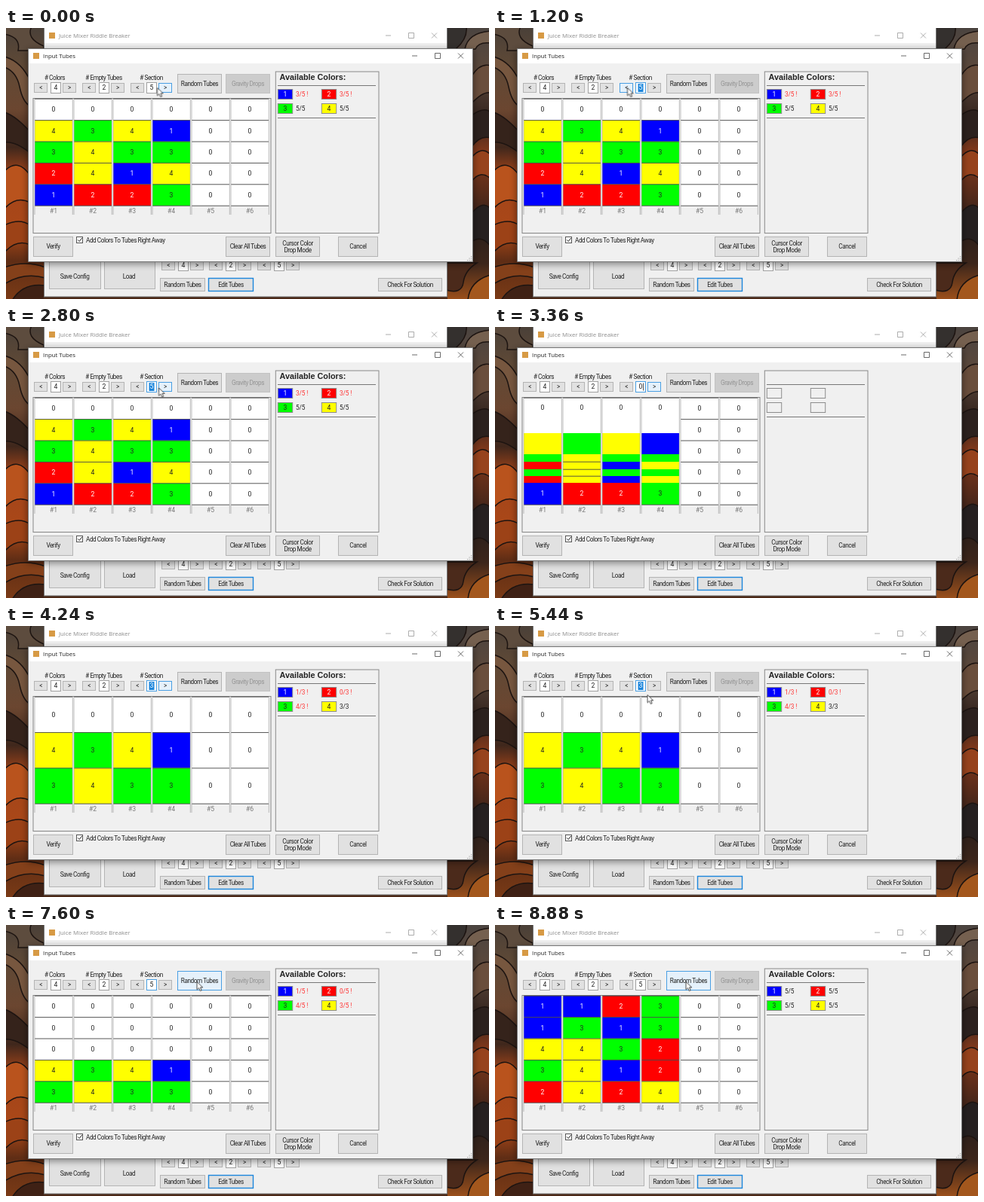
Recreate the animation shown at these times as an HTML page. Size 640x360 px, loop 8.96 s.

```html
<!DOCTYPE html>
<html lang="en">
<head>
<meta charset="utf-8">
<title>Tube editor</title>
<style>
  html, body { margin: 0; width: 100%; height: 100%; overflow: hidden; background: #42271a; }
  svg { display: block; position: absolute; left: 0; top: 0; }
  text { font: 8.2px Roboto, "Liberation Sans", sans-serif; letter-spacing: -.44px; fill: #222; }
  .title { font: 7.8px "Open Sans", sans-serif; letter-spacing: 0; }
  .head { font: bold 10.8px "Liberation Sans", Arial, sans-serif; letter-spacing: 0; }
  .num { font-size: 8.6px; letter-spacing: 0; }
  .bang { letter-spacing: -.1px; }
</style>
</head>
<body>
<svg width="640" height="360" viewBox="0 0 640 360">
  <defs>
    <linearGradient id="wallL" x2="0" y2="1">
      <stop offset="0" stop-color="#4a4038"/><stop offset=".14" stop-color="#5f4936"/>
      <stop offset=".3" stop-color="#6b4630"/><stop offset=".44" stop-color="#3f271c"/>
      <stop offset=".54" stop-color="#a1441a"/><stop offset=".75" stop-color="#ab4818"/>
      <stop offset=".86" stop-color="#5f2d15"/><stop offset="1" stop-color="#7a3a16"/>
    </linearGradient>
    <linearGradient id="wallR" x2="0" y2="1">
      <stop offset="0" stop-color="#4b4440"/><stop offset=".16" stop-color="#5c483b"/>
      <stop offset=".33" stop-color="#35251f"/><stop offset=".46" stop-color="#83391b"/>
      <stop offset=".6" stop-color="#5a2c1a"/><stop offset=".74" stop-color="#2b1f1b"/>
      <stop offset=".87" stop-color="#3d261b"/><stop offset="1" stop-color="#9a4f1b"/>
    </linearGradient>
    <filter id="soft" x="-5%" y="-5%" width="110%" height="115%"><feGaussianBlur stdDeviation="4"/></filter>
  </defs>
  <g id="base"></g>
  <g id="live"></g>
  <path id="cursor" d="M0 0V10.4L2.5 8.1L4.3 12L6.2 11.2L4.5 7.4H7.8Z" fill="#fff" stroke="#222" stroke-width=".8"/>
</svg>
<script>
const LOOP = 8960;
const $ = id => document.getElementById(id);
const COLORS = ['#fff', '#00f', '#f00', '#0f0', '#ff0'];

const rect = (x, y, w, h, fill, stroke = 'none', sw = 1) =>
  `<rect x="${x}" y="${y}" width="${w}" height="${h}" fill="${fill}" stroke="${stroke}" stroke-width="${sw}"/>`;
const path = (d, stroke, sw = 1, fill = 'none') =>
  `<path d="${d}" fill="${fill}" stroke="${stroke}" stroke-width="${sw}"/>`;
const text = (x, y, s, { anchor = 'middle', fill = '#222', cls = '' } = {}) =>
  `<text x="${x}" y="${y + 2.9}" text-anchor="${anchor}" style="fill:${fill}" class="${cls}">${s}</text>`;
const left = (x, y, s, o) => text(x, y, s, { anchor: 'start', ...o });

function button(x, y, w, h, label, look = '') {
  const [fill, stroke, ink, sw] = {
    hot: ['#e5f1fb', '#4a9fe3', '#222', 1],
    main: ['#e1e1e1', '#1c86dc', '#222', 1.4],
    off: ['#cccccc', '#c2c2c2', '#949494', 1],
  }[look] || ['#e1e1e1', '#b4b4b4', '#222', 1];
  const lines = label.split('|');
  return rect(x + .5, y + .5, w - 1, h - 1, fill, stroke, sw) + lines.map((s, i) =>
    text(x + w / 2, y + h / 2 + (i - (lines.length - 1) / 2) * 9, s, { fill: ink })).join('');
}

const field = (x, y, value, stroke = '#a0a0a0') =>
  rect(x + .5, y + .5, 13, 14, '#fff', stroke) + text(x + 7, y + 7.5, value, { cls: 'num' });

const spinner = (x, y, value) =>
  button(x, y + 1, 18, 13, '&lt;') + field(x + 22, y, value) + button(x + 38, y + 1, 18, 13, '&gt;');

// Minimise, maximise and close marks
const captionMarks = (x, y, ink) =>
  path(`M${x} ${y}h7M${x + 30.5} ${y - 3.5}h7v7h-7zM${x + 61} ${y - 3.5}l7 7m0-7l-7 7`, ink, .8);

function wallpaper() {
  const blob = (d, fill) => path(d, '#1d1411', 1.5, fill);
  return rect(0, 0, 60, 360, 'url(#wallL)') + rect(580, 0, 60, 360, 'url(#wallR)') +
    blob('M-2 -2H34Q26 14 50 24V30H16Q20 12 -2 8Z', '#5d4c3e') +
    blob('M-2 52Q14 58 18 78T32 104V70Q20 44 -2 38Z', '#77573f') +
    blob('M-2 112Q12 116 32 138V166Q12 150 -2 152Z', '#35231b') +
    blob('M-2 190Q16 172 32 196V232Q14 222 -2 240Z', '#b9531d') +
    blob('M-2 262Q18 252 32 262V288Q14 280 -2 298Z', '#9c4217') +
    blob('M-2 318Q26 308 52 318V332Q24 324 -2 340Z', '#84401a') +
    blob('M8 362Q22 338 52 342V362Z', '#3f2115') +
    blob('M583 -2H610Q612 14 596 28H583Z', '#34302e') +
    blob('M608 28Q612 6 642 4V20Q626 18 622 28Z', '#75604f') +
    blob('M617 64Q628 46 642 50V86Q632 84 617 100Z', '#6a4e3c') +
    blob('M617 116Q634 104 642 112V146Q628 142 617 158Z', '#2c211e') +
    blob('M617 172Q630 156 642 168V200Q628 188 617 204Z', '#97431d') +
    blob('M617 246Q632 228 642 240V290Q630 274 617 284Z', '#262020') +
    blob('M583 312H624Q608 322 606 338T583 348Z', '#4b2a1b') +
    blob('M612 362Q614 336 642 328V362Z', '#a3571d') +
    rect(50, 357, 535, 3, '#4b2917');
}

function rearWindow() {
  return rect(50.5, -1, 534, 358, '#f0f0f0', '#777') + rect(51, 0, 533, 20, '#fff') +
    rect(57, 6, 8, 8, '#d79a45') +
    left(70, 10, 'Juice Mixer Riddle Breaker', { cls: 'title', fill: '#8c8c8c' }) +
    captionMarks(503, 10, '#999') +
    button(57, 300, 69, 47, '') + text(91, 330, 'Save Config') +
    button(130, 300, 68, 47, '') + text(163, 330, 'Load') +
    [[206, 4], [269, 2], [333, 5]].map(([x, v]) => spinner(x, 308, v)).join('') +
    button(204, 332, 60, 18, 'Random Tubes') + button(268, 332, 60, 18, 'Edit Tubes', 'main') +
    button(493, 332, 85, 18, 'Check For Solution');
}

function frontWindow() {
  let grip = '';
  for (let i = 0; i < 3; i++)
    for (let j = 0; j <= i; j++) grip += rect(616 - 2.5 * j, 303 + 2.5 * i, 1.2, 1.2, '#aaa');
  return `<rect x="28" y="29" width="592" height="285" opacity=".4" filter="url(#soft)"/>` +
    rect(29.5, 27.5, 589, 283, '#f0f0f0', '#777') + rect(30, 28, 588, 19, '#fff') +
    rect(36, 33, 8, 8, '#d79a45') + left(49, 37, 'Input Tubes', { cls: 'title' }) +
    captionMarks(538, 37, '#444') +
    text(64.5, 66, '# Colors') + text(129.5, 66, '# Empty Tubes') + text(192.5, 66, '# Section') +
    spinner(37, 72, 4) + spinner(101, 72, 2) +
    button(291, 61, 59, 26, 'Gravity Drops', 'off') +
    rect(36, 93.5, 315, 179, '#f0f0f0', '#858585') +
    rect(357.3, 58, 136.7, 214.5, '#f0f0f0', '#8a8a8a') +
    path('M360 76.5H490M360 119.5H490', '#777') +
    button(36, 277, 53, 27, 'Verify') +
    rect(93.5, 277.5, 8, 8, '#fff', '#555') + path('M95.2 281.4l2 2.1l3.4-4.5', '#222') +
    left(106, 282, 'Add Colors To Tubes Right Away') +
    button(291, 277, 59, 27, 'Clear All Tubes') +
    button(357, 277, 59, 27, 'Cursor Color|Drop Mode') + button(440, 277, 53, 27, 'Cancel') + grip;
}

const ink = c => c == 1 || c == 2 ? '#fff' : '#222';

function cell(col, y, h, c, { label = true, line = true, labelY = y + h / 2 } = {}) {
  const x = 38 + col * 52;
  return rect(x, y, 50, h, COLORS[c]) + (line ? path(`M${x} ${y + .2}h50`, '#444', .9) : '') +
    (label ? text(x + 25, labelY, c, { fill: ink(c), cls: 'num' }) : '');
}

// A column caught halfway through its repaint
function torn(col, colors) {
  const edges = [141, 169, 179, 189, 198, 207, 236];
  return cell(col, 94, 47, 0, { labelY: 107.5 }) + [...colors].map((c, i) =>
    cell(col, edges[i], edges[i + 1] - edges[i], c, { label: i == 5, line: c == colors[i - 1] })).join('');
}

function tubes({ rows, tornCols }) {
  let out = '';
  for (let col = 0; col < 6; col++) {
    const x = 38 + col * 52, h = 142 / rows.length;
    out += rect(x - 1, 94, 52, 142, '#fff');
    out += tornCols && col < 4 ? torn(col, tornCols[col])
      : rows.map((r, i) => cell(col, 94 + i * h, h, r[col] || 0)).join('');
    out += path(`M${x} 236.2h50`, '#444', .9) + path(`M${x} 94V248M${x + 50.3} 94V248`, '#aaa', .8) +
      text(x + 25, 243.5, '#' + (col + 1), { fill: '#777', cls: 'num' });
  }
  return out;
}

function legend({ counts, heading }) {
  let out = heading ? left(362.5, 66.2, 'Available Colors:', { cls: 'head' }) : '';
  for (let i = 0; i < 4; i++) {
    const x = 360 + (i % 2) * 58, y = i < 2 ? 82 : 101, c = i + 1;
    out += rect(x + .3, y - .5, 19.4, 13, counts ? COLORS[c] : '#f0f0f0', '#8c8c8c');
    if (!counts) continue;
    const n = counts[i], full = n[0] == n[2];
    out += text(x + 10, y + 6, c, { fill: ink(c), cls: 'num' }) +
      left(x + 24, y + 6, full ? n : n + ' !', { fill: full ? '#222' : '#f33', cls: 'bang' });
  }
  return out;
}

function section({ sec, sel, caret, focus, hot }) {
  const look = k => hot == k ? 'hot' : '';
  return button(165, 73, 18, 13, '&lt;', look('less')) + button(202, 73, 18, 13, '&gt;', look('more')) +
    field(186, 72, sec, focus ? '#4a9fe3' : '#a0a0a0') +
    (sel ? rect(189.5, 74, 7, 11, '#1c86dc') + text(193, 79.5, sec, { fill: '#fff', cls: 'num' }) : '') +
    (caret ? path('M196.5 74.5v10', '#222', .8) : '') +
    button(227, 61, 59, 26, 'Random Tubes', look('random'));
}

const split = s => s.split(' ');
const FIVE = split('0000 4341 3433 2414 1223');
const STEPS = [
  [0, { sec: 5, sel: false, caret: false, focus: false, hot: 'more', rows: FIVE, tornCols: null,
        heading: true, counts: split('3/5 3/5 5/5 5/5') }],
  [400, { hot: '' }],
  [640, { hot: 'less' }],
  [1040, { sel: true, focus: true }],
  [2640, { hot: '' }],
  [2800, { hot: 'more' }],
  [2960, { sec: 0, sel: false, caret: true }],
  [3280, { tornCols: split('432321 344442 431312 134343'), counts: null, heading: false }],
  [3520, { sec: 3, tornCols: null, rows: FIVE.slice(0, 3) }],
  [3680, { heading: true }],
  [3920, { counts: split('1/3 0/3 4/3 3/3') }],
  [4080, { sel: true, caret: false }],
  [5040, { hot: '' }],
  [5840, { sec: 0, sel: false, caret: true }],
  [6080, { sec: 5, rows: split('0000 0000 0000 4341 3433') }],
  [6400, { counts: split('1/5 0/5 4/5 3/5'), caret: false }],
  [7200, { hot: 'random' }],
  [7920, { focus: false }],
  [8080, { rows: split('1123 1313 4432 3412 2424') }],
  [8400, { counts: split('5/5 5/5 5/5 5/5') }],
];

// time, x, y, opacity
const MOVES = [
  [0, 200.5, 79.5, 1], [160, 200.5, 79.5, 1], [880, 175.5, 79.5, 1], [2400, 175.5, 79.5, 1],
  [2880, 204, 81, 1], [2960, 204, 81, 1], [2960, 204, 81, 0], [4400, 204, 81, 0],
  [4400, 204, 81, 1], [4720, 204, 81, 1], [5200, 202, 91.5, 1], [5840, 202, 91.5, 1],
  [5840, 202, 91.5, 0], [6800, 202, 91.5, 0], [6800, 202, 91.5, 1],
  [7440, 253, 75.5, 1], [LOOP, 253, 75.5, 1],
];

$('base').innerHTML = wallpaper() + rearWindow() + frontWindow();
const glide = $('cursor').animate(MOVES.map(([t, x, y, opacity]) =>
  ({ offset: t / LOOP, transform: `translate(${x}px, ${y}px)`, opacity, easing: 'ease-in-out' })),
  { duration: LOOP, iterations: Infinity });
glide.pause();

const start = performance.now();
let shown = -1;
function frame(now) {
  const t = Math.max(0, now - start) % LOOP;
  glide.currentTime = t;
  const count = STEPS.filter(([at]) => at <= t).length;
  if (count != shown) {
    shown = count;
    const state = Object.assign({}, ...STEPS.slice(0, count).map(s => s[1]));
    $('live').innerHTML = section(state) + tubes(state) + legend(state);
  }
  requestAnimationFrame(frame);
}
frame(start);
</script>
</body>
</html>
```
